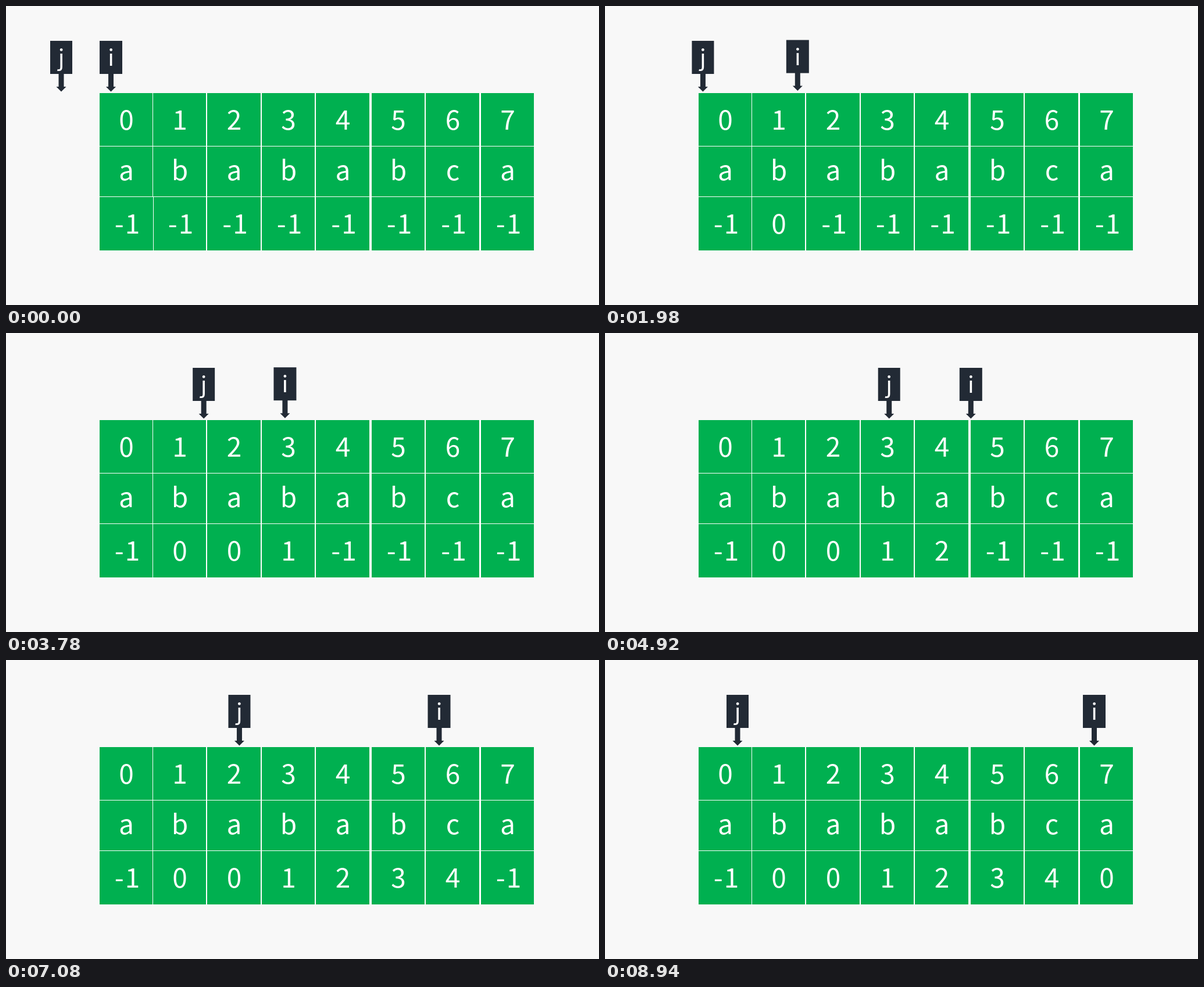
Animation, 1020 px wide and 515 px high, one loop 9.18 s. Source, as an HTML page:

```html
<!DOCTYPE html>
<html lang="en">
<head>
<meta charset="utf-8">
<title>Building the next table</title>
<style>
  html, body { margin: 0; width: 100%; height: 100%; overflow: hidden; background: #f8f8f8; }
  svg { display: block; width: 100vw; height: 100vh; }
  text {
    fill: #fff; text-anchor: middle; font-size: 46px; font-weight: 300;
    font-family: "Noto Sans CJK SC", "Noto Sans CJK JP", "Noto Sans CJK", "Open Sans", sans-serif;
  }
  .pointer { fill: #222a35; }
  .pointer text { font-size: 39px; }
</style>
</head>
<body>
<svg id="stage" viewBox="0 0 1020 515"></svg>
<script>
const LOOP = 9180, LEAD = 360, TICK = 60;
const PATTERN = "ababaca".replace("aca", "abca");
const GREEN = "#00b050";

// Left and right edges of the columns; top, bottom and baseline of the rows.
const COLUMNS = [[161, 252], [253, 344], [346, 438], [440, 531],
                 [533, 625], [629, 720], [722, 814], [817, 908]];
const ROWS = [[150, 241, 213], [242, 328, 300], [329, 421, 392]];

// Resting places of the pointers; J_X starts at index -1.
const I_X = [161, 261, 353, 444, 538.5, 628, 725.5, 822];
const I_Y = [60, 58, 59, 59, 60, 60, 60, 60];
const J_X = [76, 209, 305, 398, 488, 583];

const stage = document.getElementById("stage");

function add(parent, tag, attrs, content = "") {
  const node = document.createElementNS("http://www.w3.org/2000/svg", tag);
  for (const key in attrs) node.setAttribute(key, attrs[key]);
  node.textContent = content;
  return parent.appendChild(node);
}

function rect(parent, left, top, right, bottom, fill) {
  return add(parent, "rect", { x: left, y: top, width: right - left, height: bottom - top, fill });
}

function label(parent, column, row, content) {
  const [left, right] = COLUMNS[column];
  const wide = content.length > 1;
  return add(parent, "text", {
    x: (left + right) / 2 + (wide ? 3 : 0.5),
    y: ROWS[row][2],
    "letter-spacing": wide ? 2 : 0
  }, content);
}

function pointer(name, width) {
  const group = add(stage, "g", { class: "pointer" });
  const mid = width / 2;
  rect(group, 0, 0, width, 57, "#222a35");
  add(group, "path", { d: `M${mid - 4.5} 56h9v23h4l-8.5 8.5l-8.5 -8.5h4z` });
  add(group, "text", { x: mid, y: 43 }, name);
  return group;
}

// One state per half beat: pointers move, or a table entry is filled in.
function trace(pattern) {
  const next = [-1], states = [];
  let i = 0, j = -1, filled = 0;
  const save = () => states.push({ i, j, filled });
  save();
  while (i < pattern.length - 1) {
    if (j < 0 || pattern[i] === pattern[j]) {
      next[++i] = ++j;
      save();
      filled = i;
    } else {
      j = next[j];
    }
    save();
  }
  return { next, states };
}

const { next, states } = trace(PATTERN);

rect(stage, 161, 150, 908, 421, "#fff");
const entries = COLUMNS.map(([left, right], column) => {
  ROWS.forEach(([top, bottom], row) => rect(stage, left, top, right, bottom, GREEN));
  label(stage, column, 0, String(column));
  label(stage, column, 1, PATTERN[column]);
  const before = add(stage, "g", {}), after = add(stage, "g", {});
  if (column === 1) {
    // The unfilled cell sits one pixel further right.
    rect(before, 252, 329, 253, 421, GREEN);
    rect(before, 253, 329, 254, 421, "#fff");
  }
  label(before, column, 2, "-1");
  label(after, column, 2, String(next[column]));
  return { before, after };
});
const pointerJ = pointer("j", 38);
const pointerI = pointer("i", 39);

const ease = p => p < 0.5 ? 2 * p * p : 1 - 2 * (1 - p) ** 2;
const mix = (a, b, p) => a + (b - a) * p;
const place = (node, x, y) => node.setAttribute("transform", `translate(${x} ${y})`);

function draw(time) {
  const ticks = Math.floor((time - LEAD) / TICK) + 1;
  const beat = ticks < 1 ? 0 : Math.min(ticks * 0.1256 + 0.01, states.length - 1);
  const index = Math.min(Math.floor(beat), states.length - 2);
  const from = states[index], to = states[index + 1];
  const p = beat - index, e = ease(p);

  place(pointerI, mix(I_X[from.i], I_X[to.i], e), mix(I_Y[from.i], I_Y[to.i], e));
  place(pointerJ, mix(J_X[from.j + 1], J_X[to.j + 1], e), 60);
  entries.forEach(({ before, after }, column) => {
    const shown = column === 0 || column > to.filled ? 0 : column > from.filled ? p : 1;
    before.setAttribute("opacity", 1 - shown);
    after.setAttribute("opacity", shown);
  });
}

const start = performance.now();
function frame() {
  draw((performance.now() - start) % LOOP);
  requestAnimationFrame(frame);
}
draw(0);
requestAnimationFrame(frame);
</script>
</body>
</html>
```
